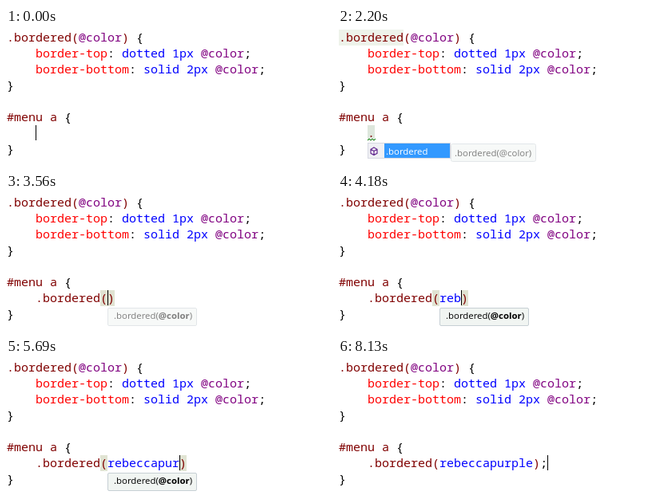
Recreate the animation shown at these times as an HTML page. Size 408 by 172 pixels, loop 8.33 s.

```html
<!DOCTYPE html>
<html lang="en">
<head>
<meta charset="utf-8">
<title>Mixin completion</title>
<style>
  html, body { margin: 0; width: 100%; height: 100%; overflow: hidden; background: #fff; }
  svg { display: block; width: 100vw; height: 100vh; }
  text { white-space: pre; }
  .code { font: 15px "Noto Sans Mono", monospace; }
  .ui { font: 11.4px "Open Sans", sans-serif; }
  .sel { fill: #800000; }
  .prop { fill: #f00; }
  .val { fill: #00f; }
  .var { fill: #800080; }
  .brace { fill: #e0e3d2; }
  .box { fill: #f1f5f2; stroke: #c6cfd4; }
</style>
</head>
<body>
<svg viewBox="0 0 408 172">
  <rect width="408" height="172" fill="#fff"/>
  <rect id="defMark" x="1" y="2" width="81" height="20" fill="#eef3ea"/>
  <rect id="useMark" x="37" y="122" height="20" fill="#dde6dc"/>
  <rect id="open" class="brace" x="118" y="122" width="9" height="20"/>
  <rect id="close" class="brace" y="122" width="9" height="20"/>
  <g id="lines" class="code"></g>
  <path id="squiggle" fill="none" stroke="#008000"/>
  <rect id="caret" y="122" width="1" height="19"/>

  <g id="list">
    <rect x="37.5" y="144.5" width="103" height="19" fill="#f0f0f4" stroke="#d6d8e2"/>
    <path d="M45 150l4 2.3v5l-4 2.3l-4-2.3v-5zM41 152.3l4 2.3l4-2.3M45 154.6v5"
          fill="#f3eaf8" stroke="#652d90" stroke-width="1.2"/>
    <rect id="item" x="58.5" y="145.5" width="81" height="17" stroke="#3399ff"/>
    <text id="itemText" class="ui" x="60" y="159">.bordered</text>
  </g>
  <g id="hint">
    <rect class="box" x="141.5" y="145.5" width="106" height="22" rx="2"/>
    <text class="ui" x="146" y="161">.bordered(@color)</text>
  </g>
  <g id="signature">
    <rect class="box" x="127.5" y="144.5" width="111" height="22" rx="1.5"/>
    <text class="ui" x="135" y="158">.bordered(<tspan font-weight="700">@color</tspan>)</text>
  </g>
</svg>
<script>
  const LOOP = 8330, CELL = 9, LEFT = 1, ROW = 20;
  const WORD = 'rebeccapurple';
  const el = id => document.getElementById(id);
  const colX = col => LEFT + col * CELL;
  const show = (id, opacity) => el(id).setAttribute('opacity', +opacity);
  const span = (cls, text) => `<tspan class="${cls}">${text}</tspan>`;

  const rule = (name, value) =>
    '    ' + span('prop', name) + ': ' + span('val', value) + ' ' + span('var', '@color') + ';';

  const source = [
    span('sel', '.bordered(') + span('var', '@color') + span('sel', ')') + ' {',
    rule('border-top', 'dotted 1px'),
    rule('border-bottom', 'solid 2px'),
    '}',
    '',
    span('sel', '#menu a') + ' {',
    '',
    '}'
  ];
  el('lines').innerHTML = source.map((line, i) =>
    `<text x="${LEFT}" y="${17 + i * ROW}">${line}</text>`).join('');
  const typed = el('lines').children[6];

  // Each step overrides part of the editor state from its time on.
  const steps = [
    [0, { name: '', parens: '', n: 0, end: 0, caret: 1, def: 0, use: 0, wavy: 0,
          braces: 0, list: 0, picked: 0, hint: 0, sig: 0 }],
    [130, { caret: 0 }],
    [660, { name: '.', caret: 1, wavy: 1 }],
    [860, { list: 1 }],
    [910, { use: 1 }],
    [950, { def: 1 }],
    [1250, { picked: 1 }],
    [1410, { caret: 0 }],
    [1740, { caret: 1 }],
    [1970, { hint: 0.2 }],
    [2170, { hint: 0.35 }],
    [2200, { hint: 0.5, caret: 0 }],
    [2230, { hint: 0.65 }],
    [2260, { hint: 0.85 }],
    [2290, { hint: 1 }],
    [2750, { caret: 1 }],
    [2950, { name: '.bordered', list: 0, hint: 0, def: 0, use: 0 }],
    [3080, { use: 1 }],
    [3110, { def: 1 }],
    [3440, { parens: '()', use: 0, def: 0, wavy: 0 }],
    [3500, { braces: 1, sig: 0.25 }],
    [3550, { sig: 0.5 }],
    [3600, { sig: 0.75 }],
    [3650, { sig: 1 }],
    [3720, { n: 1 }],
    [4020, { n: 2 }],
    [4180, { n: 3 }],
    [4310, { n: 4, braces: 0 }],
    [4410, { braces: 1 }],
    [4570, { n: 5, braces: 0 }],
    [4630, { n: 6 }],
    [4830, { braces: 1 }],
    [4910, { n: 7, braces: 0 }],
    [4990, { braces: 1 }],
    [5150, { caret: 0 }],
    [5280, { n: 8, braces: 0, caret: 1 }],
    [5510, { n: 9 }],
    [5570, { braces: 1 }],
    [5630, { n: 10, braces: 0 }],
    [5690, { braces: 1 }],
    [5920, { n: 11, braces: 0 }],
    [5980, { braces: 1 }],
    [6140, { n: 12, braces: 0 }],
    [6170, { n: 13 }],
    [6230, { braces: 1 }],
    [6560, { caret: 0 }],
    [6590, { caret: 1, end: 1, sig: 0.5 }],
    [6720, { sig: 0 }],
    [7080, { end: 2 }],
    [7140, { braces: 0 }],
    [7600, { caret: 0 }],
    [8130, { caret: 1 }]
  ];

  const stateAt = t => Object.assign({}, ...steps.filter(s => s[0] <= t).map(s => s[1]));

  function wave(x, width) {
    let d = `M${x} 141`;
    for (let i = 2; i <= width; i += 2) d += `L${x + i} ${i % 4 ? 139 : 141}`;
    return d;
  }

  function draw(t) {
    const s = stateAt(t);
    const word = WORD.slice(0, s.n);
    const nameEnd = 4 + s.name.length;
    const wordEnd = nameEnd + (s.parens ? 1 + s.n : 0);
    const [left = '', right = ''] = s.parens;

    typed.innerHTML = '    ' + span('sel', s.name + left) + span('val', word) +
      span('sel', right) + (s.end > 1 ? ';' : '');

    el('caret').setAttribute('x', colX(wordEnd + s.end));
    el('close').setAttribute('x', colX(wordEnd));
    el('useMark').setAttribute('width', s.name.length * CELL);
    el('squiggle').setAttribute('d', wave(37, s.name.length * CELL + 1));
    el('item').setAttribute('fill', s.picked ? '#3399ff' : '#f6f6f6');
    el('itemText').setAttribute('fill', s.picked ? '#fff' : '#1e1e1e');

    show('caret', s.caret);
    show('defMark', s.def);
    show('useMark', s.use);
    show('squiggle', s.wavy);
    show('open', s.braces);
    show('close', s.braces);
    show('list', s.list);
    show('hint', s.hint);
    show('signature', s.sig);
  }

  const start = performance.now();
  function tick() {
    draw((performance.now() - start) % LOOP);
    requestAnimationFrame(tick);
  }
  tick();
</script>
</body>
</html>
```
